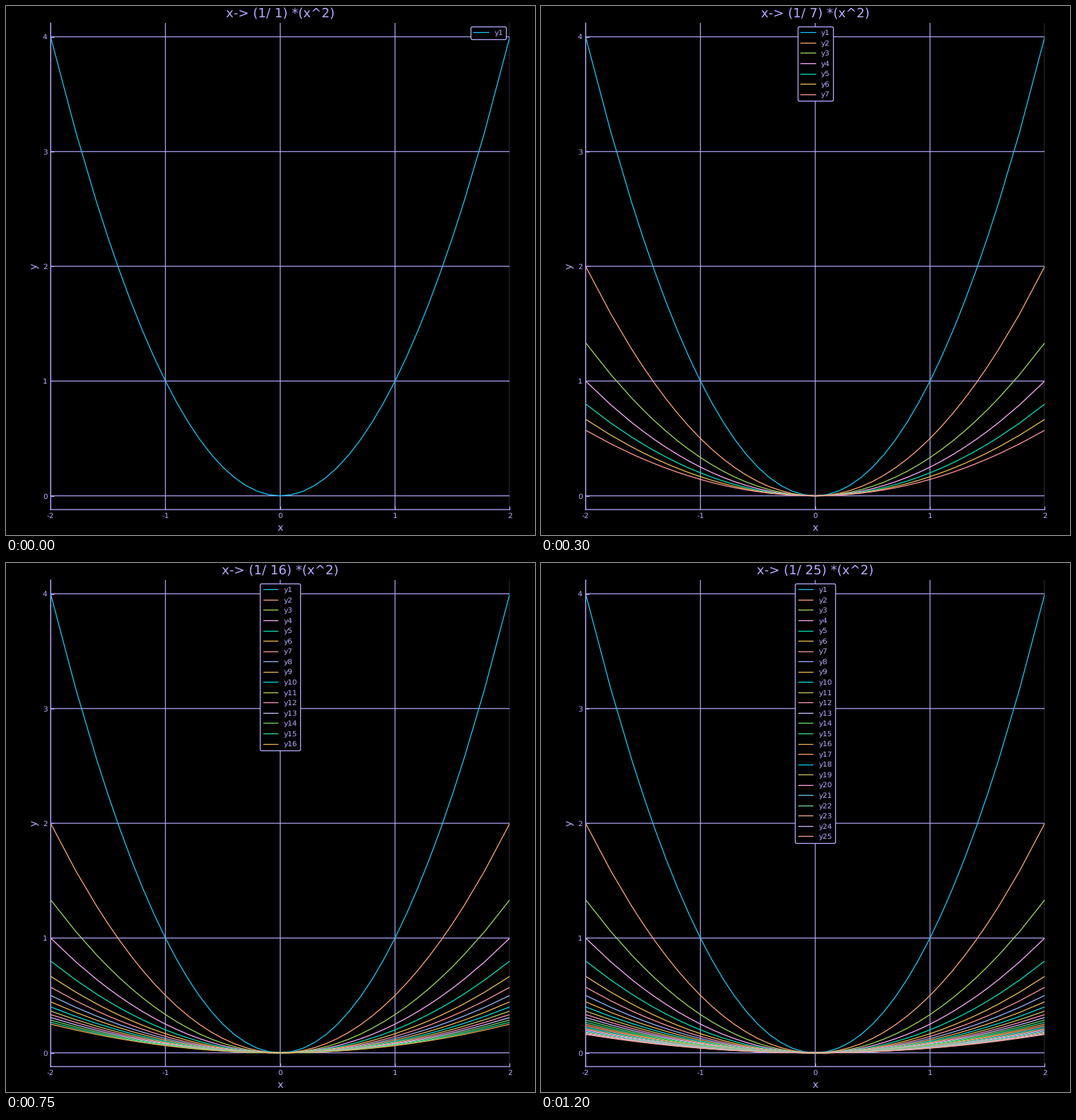
A matplotlib script for the animation above (1.25 s loop, 748 px wide and 748 px high).

```python
import numpy as np
import matplotlib.pyplot as plt
from matplotlib.animation import FuncAnimation

SIZE, DPI = 748, 93.5
COUNT, INTERVAL = 25, 50
FG = "#b5abff"
COLORS = [
    "#14c8f5", "#ffa573", "#a0d75f", "#ffaaff", "#00e1b4",
    "#ebbe50", "#ff969b", "#96b4ff", "#f0b450", "#00dcdc",
    "#c3c85a", "#ff96b9", "#cdbeff", "#6ed76e", "#2ddc96",
    "#ebaf55", "#ffa073", "#00d2e6", "#cdbe64", "#ffa5eb",
    "#6ec8eb", "#6ed7a0", "#f5aa82", "#d2b4ff", "#f0a591",
]
LEFT, RIGHT, TOP, BOTTOM = 63.1, 712.4, 24.05, 712.05
EM = 8 * DPI / 72
ROW_PITCH = 14.545

plt.rcParams.update({
    "font.family": "DejaVu Sans",
    "text.hinting": "none",
    "text.color": FG,
    "axes.labelcolor": FG,
    "axes.edgecolor": FG,
    "axes.linewidth": 1,
    "lines.linewidth": 1,
})

fig = plt.figure(figsize=(SIZE / DPI, SIZE / DPI), dpi=DPI, facecolor="black")
ax = fig.add_axes(
    [LEFT / SIZE, 1 - BOTTOM / SIZE, (RIGHT - LEFT) / SIZE, (BOTTOM - TOP) / SIZE],
    facecolor="black",
)
ax.set(xlim=(-2, 2), ylim=(-0.12, 4.12))
ticks = range(-2, 3)
ax.set_xticks(ticks, [str(t) for t in ticks])
ax.set_yticks(range(5))
ax.tick_params(direction="in", color=FG, labelcolor=FG, labelsize=8)
ax.grid(True, color=FG, alpha=0.92, linewidth=1)
ax.set_axisbelow(True)
ax.spines[["top", "right"]].set_visible(False)
ax.set_xlabel("x", fontsize=11)
ax.set_ylabel("y", fontsize=11)
title = ax.set_title("", fontsize=14)

# Keep thin lines at their fractional pixel positions
for spine in ax.spines.values():
    spine.set_snap(False)
for tick in ax.xaxis.get_major_ticks() + ax.yaxis.get_major_ticks():
    tick.gridline.set_snap(False)
    tick.tick1line.set_snap(False)

# Legend rows get the same pitch whatever the text height is
probe = fig.text(0, 0, "lp", fontsize=8)
row_gap = (ROW_PITCH - probe.get_window_extent().height) / EM
probe.remove()

# Coarse sampling near the ends leaves the curves slightly angular
half = np.append(np.arange(17) / 10, [1.78, 2])
xs = np.concatenate([-half[:0:-1], half])


def draw(i):
    n = i + 1
    for line in list(ax.lines):
        line.remove()
    for k in range(1, n + 1):
        ax.plot(xs, xs**2 / k, color=COLORS[k - 1], label=f"y{k}")
    title.set_text(f"x-> (1/ {n}) *(x^2)")
    legend = ax.legend(
        loc="best", fontsize=8, labelspacing=row_gap, labelcolor=FG,
        facecolor="black", edgecolor=FG, framealpha=1,
    )
    legend.set_zorder(999)
    return [*ax.lines, title, legend]


anim = FuncAnimation(
    fig, draw, frames=COUNT, interval=INTERVAL, init_func=lambda: draw(0),
    repeat=True, repeat_delay=0,
)
plt.show()
```
